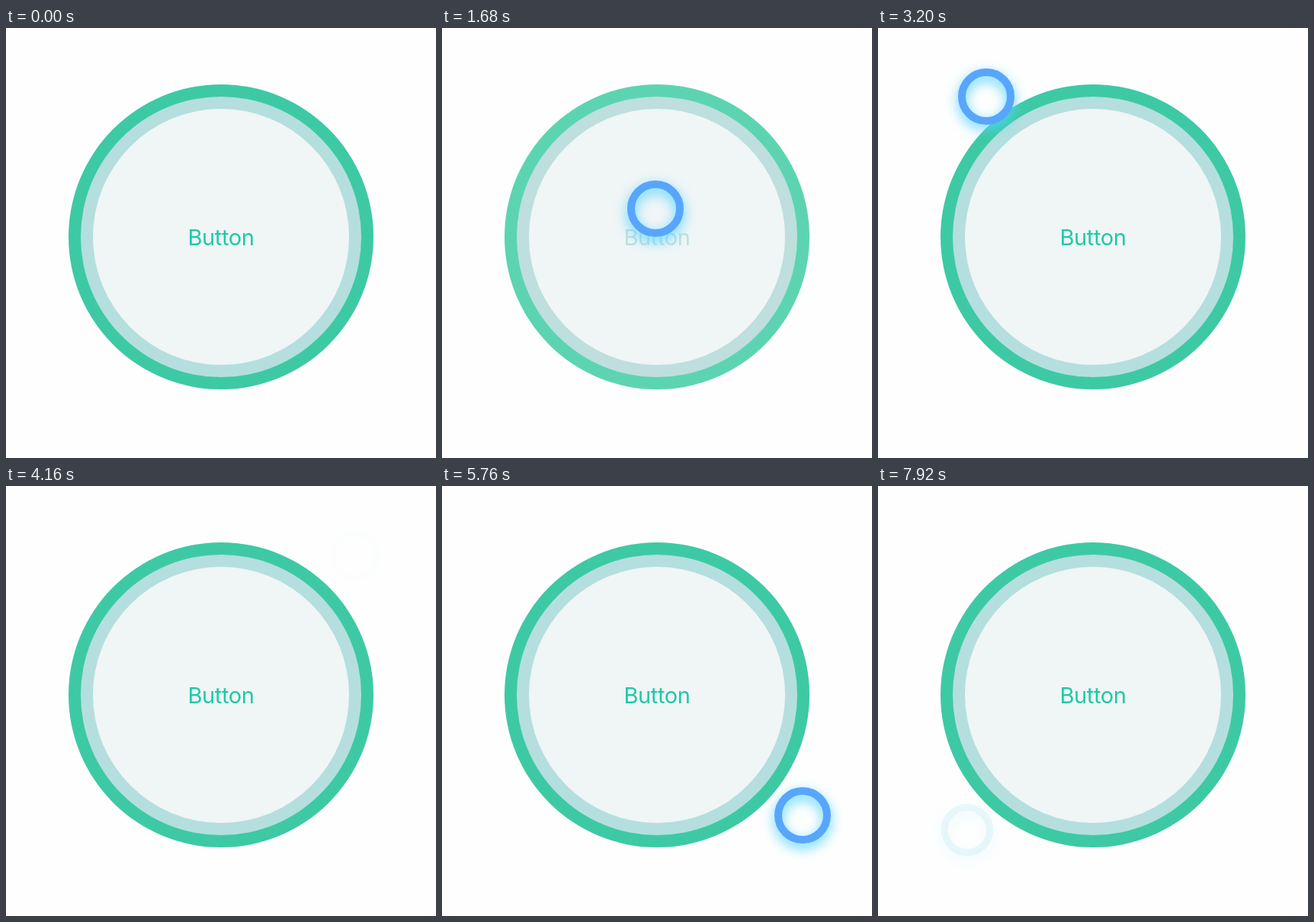
Recreate the animation shown at these times as an HTML page with a canvas. Size 564 by 564 pixels, loop 8 s.

```html
<!DOCTYPE html>
<html lang="en">
<head>
<meta charset="utf-8">
<title>Button taps</title>
<style>
  html, body { margin: 0; width: 100%; height: 100%; overflow: hidden; background: #fefefe; }
  canvas { display: block; width: 564px; height: 564px; }
</style>
</head>
<body>
<canvas id="stage" width="564" height="564"></canvas>
<script>
const ctx = document.getElementById('stage').getContext('2d');
const LOOP = 8000;
const FADE_IN = 160;
const FADE_OUT = 300;

// Each tap: position, finger down and finger up in ms
const taps = [
  { x: 280, y: 237, down: 960, up: 2010 },
  { x: 142, y: 90, down: 2760, up: 3330 },
  { x: 458, y: 91, down: 4160, up: 4840 },
  { x: 473, y: 432, down: 5540, up: 6220 },
  { x: 117, y: 451, down: 6900, up: 7650 }
];

const clamp = v => Math.min(1, Math.max(0, v));
const mix = (a, b, k) => `rgb(${a.map((v, i) => Math.round(v + (b[i] - v) * k))})`;

// 0 to 1 while the finger is down, with linear fades at both ends
const level = (t, tap) =>
  Math.min(clamp((t - tap.down) / FADE_IN), clamp(1 - (t - tap.up) / FADE_OUT));

function disc(r, color) {
  ctx.fillStyle = color;
  ctx.beginPath();
  ctx.arc(282, 274, r, 0, Math.PI * 2);
  ctx.fill();
}

function drawButton(press) {
  disc(200, mix([62, 201, 165], [92, 212, 178], press));
  disc(184, mix([180, 223, 222], [190, 223, 221], press));
  disc(168, '#f0f5f6');
  ctx.fillStyle = mix([30, 201, 167], [190, 224, 220], press);
  ctx.font = '29px Inter, Roboto, sans-serif';
  ctx.letterSpacing = '-0.4px';
  ctx.textAlign = 'center';
  ctx.textBaseline = 'alphabetic';
  ctx.fillText('Button', 282, 285);
}

function drawTouch({ x, y }, a) {
  if (a <= 0) return;
  const scale = (34 + 3 * a) / 37;
  ctx.save();
  ctx.globalAlpha = a;
  ctx.shadowColor = 'rgb(85, 212, 255)';
  ctx.shadowBlur = 16;
  ctx.shadowOffsetY = 6;
  ctx.strokeStyle = mix([75, 190, 222], [88, 166, 252], clamp((a - 0.25) / 0.25));
  ctx.lineWidth = 10 * scale;
  ctx.beginPath();
  ctx.arc(x, y, 32 * scale, 0, Math.PI * 2);
  ctx.stroke();
  ctx.restore();
}

function draw(t) {
  ctx.fillStyle = '#fefefe';
  ctx.fillRect(0, 0, 564, 564);
  drawButton(level(t, taps[0]));
  taps.forEach(tap => drawTouch(tap, level(t, tap)));
}

const start = performance.now();
function tick() {
  draw((performance.now() - start) % LOOP);
  requestAnimationFrame(tick);
}
tick();
</script>
</body>
</html>
```
